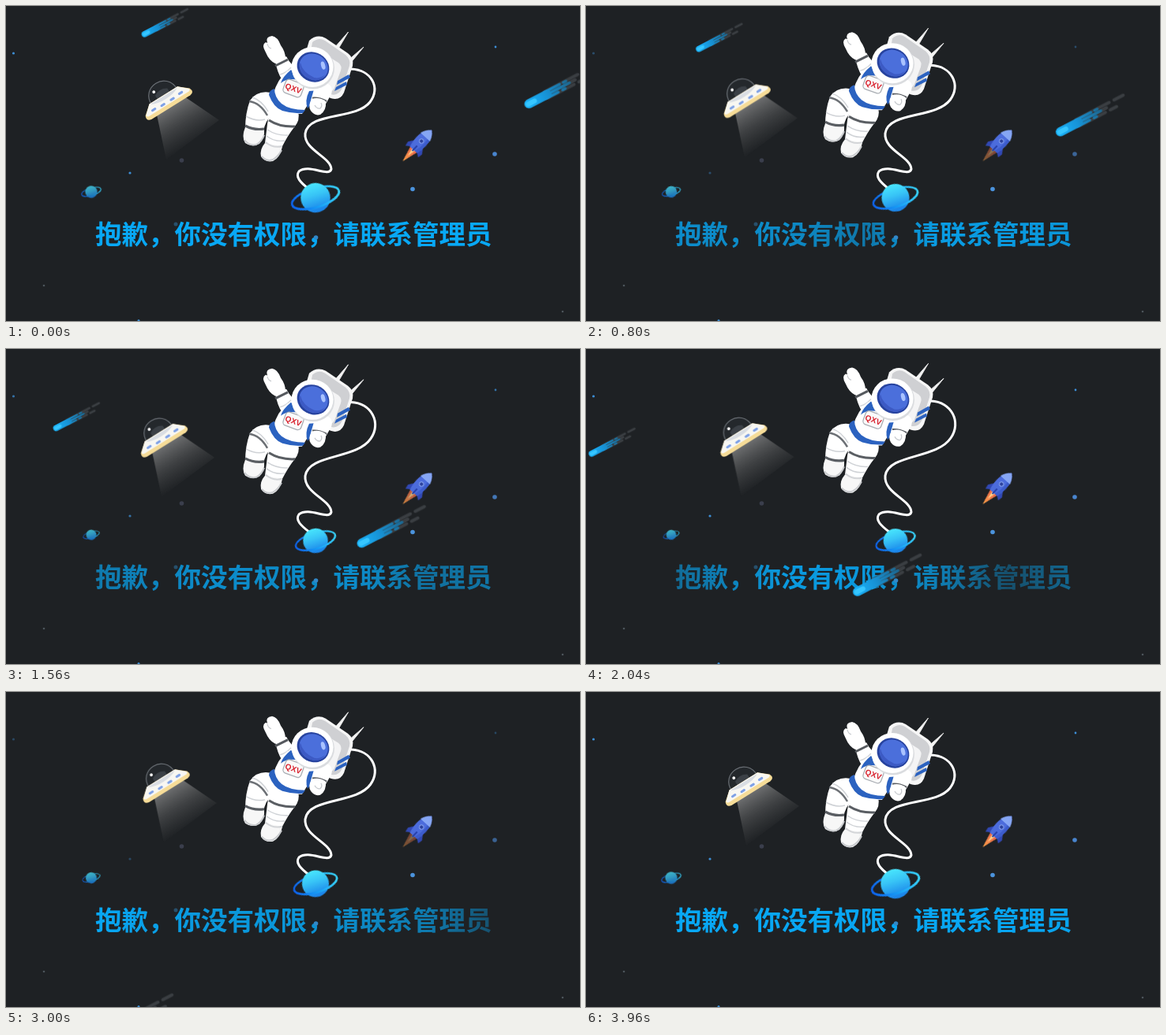
Recreate the animation shown at these times as an HTML page. Size 727 by 400 pixels, loop 4 s.

```html
<!DOCTYPE html>
<html lang="zh-CN">
<head>
<meta charset="utf-8">
<title>没有权限</title>
<style>
html, body { margin: 0; width: 100%; height: 100%; overflow: hidden; background: #1e2124; }
svg { display: block; width: 727px; height: 400px; }

.sway { animation: 2s ease-in-out infinite alternate; }
.man { animation-name: rise; }
.ufo { animation-name: drift; }
.globe { animation-name: shrink; }
.cord { animation-name: pull; fill: none; stroke: #fff; stroke-width: 3; stroke-linecap: round; }
@keyframes rise { to { transform: translateY(-14.6px); } }
@keyframes drift { to { transform: translate(-6.5px, -8px); } }
@keyframes shrink { to { transform: scale(.82); } }
@keyframes pull {
  from { d: path("M437 80C463 81 475 104 461 122C443 145 383 134 379 162C377 183 411 191 412 207C409 218 384 200 371 210C366 217 373 224 383 232"); }
  to { d: path("M437 66C463 67 476 93 462 113C444 140 383 133 379 161C377 183 411 191 412 207C409 218 384 200 371 210C366 217 373 224 385 233"); }
}

.meteor { animation: fall 4s linear infinite; }
@keyframes fall {
  0% { transform: none; animation-timing-function: cubic-bezier(.333, .029, .667, .362); }
  31.75% { transform: translateX(calc(var(--reach) * -170.2px)); }
  100% { transform: translateX(calc(var(--reach) * -870px)); }
}

.blink, .flame { animation: dim 1s ease-in-out infinite alternate; }
.blink { --low: .35; }
.faint { --low: .65; }
.flame { --low: .42; }
@keyframes dim { to { opacity: var(--low); } }

.message { font: 700 33.5px "Noto Sans CJK SC", "Noto Sans CJK", sans-serif; fill: url(#glow); }
.badge { font: 700 10px "Liberation Sans", Arial, sans-serif; fill: #d8202c; text-anchor: middle; }
#glow stop { stop-color: #08a8f5; animation: 4s linear infinite; }
#glow stop:nth-child(1) { animation-name: glow1; }
#glow stop:nth-child(2) { animation-name: glow2; }
#glow stop:nth-child(3) { animation-name: glow3; }
#glow stop:nth-child(4) { animation-name: glow4; }
#glow stop:nth-child(5) { animation-name: glow5; }
#glow stop:nth-child(6) { animation-name: glow6; }
@keyframes glow1 { 12% { stop-opacity: .84; } 28% { stop-opacity: .75; } 51% { stop-opacity: .55; } 67% { stop-opacity: 1; } }
@keyframes glow2 { 12% { stop-opacity: .85; } 28% { stop-opacity: .72; } 51% { stop-opacity: .9; } 67%, 83% { stop-opacity: .88; } }
@keyframes glow3 { 12% { stop-opacity: .6; } 28% { stop-opacity: .68; } 51% { stop-opacity: .88; } 67% { stop-opacity: .85; } 83% { stop-opacity: .9; } }
@keyframes glow4 { 12% { stop-opacity: .95; } 28% { stop-opacity: .88; } 51%, 67% { stop-opacity: .7; } 83% { stop-opacity: .85; } }
@keyframes glow5 { 12% { stop-opacity: 1; } 28% { stop-opacity: .8; } 51% { stop-opacity: .34; } 67% { stop-opacity: .58; } 83% { stop-opacity: .75; } }
@keyframes glow6 { 12% { stop-opacity: 1; } 28% { stop-opacity: .72; } 51% { stop-opacity: .52; } 67%, 83% { stop-opacity: .36; } }
</style>
</head>
<body>
<svg viewBox="0 0 727 400">
  <defs>
    <linearGradient id="glow" gradientUnits="userSpaceOnUse" x1="113" x2="615" y1="0" y2="0">
      <stop offset="0"/><stop offset=".28"/><stop offset=".48"/><stop offset=".66"/><stop offset=".84"/><stop offset="1"/>
    </linearGradient>
    <linearGradient id="ball" x1="0" y1="0" x2=".3" y2="1">
      <stop stop-color="#4df0ff"/><stop offset=".5" stop-color="#38c4f6"/><stop offset="1" stop-color="#1b86ea"/>
    </linearGradient>
    <linearGradient id="ring">
      <stop stop-color="#0c62ee"/><stop offset=".5" stop-color="#169df5"/><stop offset="1" stop-color="#37d3fa"/>
    </linearGradient>
    <linearGradient id="beam" gradientUnits="userSpaceOnUse" x1="208" y1="126" x2="238" y2="176">
      <stop stop-color="#aaa" stop-opacity=".6"/><stop offset=".5" stop-color="#888" stop-opacity=".3"/><stop offset="1" stop-color="#777" stop-opacity="0"/>
    </linearGradient>
    <linearGradient id="trail" gradientUnits="userSpaceOnUse" x1="0" x2="66" y1="0" y2="0">
      <stop stop-color="#1cb8ff"/><stop offset=".45" stop-color="#1794d8"/><stop offset="1" stop-color="#1b668f"/>
    </linearGradient>
    <linearGradient id="fire" x2="0" y2="1">
      <stop stop-color="#e8604a"/><stop offset="1" stop-color="#ffa648"/>
    </linearGradient>

    <g id="streaks" transform="rotate(2.5)" fill="none" stroke-linecap="round">
      <path d="M30 -4.5H78M85 -4.5H98M40 0H72M30 4.5H68M75 4.5H84" stroke="#3a3e42" stroke-width="4"/>
      <path d="M6 0H32" stroke="url(#trail)" stroke-width="11.5"/>
      <path d="M30 -4H52M57 -4H61M30 0H64M28 4H46M52 4H56" stroke="url(#trail)" stroke-width="3.4"/>
      <path d="M5 0H14" stroke="#36c6ff" stroke-width="6"/>
    </g>

    <g id="globe">
      <g transform="rotate(-17)" fill="none" stroke="url(#ring)" stroke-width="2.6">
        <ellipse rx="31" ry="12"/>
        <circle r="18.7" fill="url(#ball)" stroke="none" transform="rotate(17)"/>
        <path d="M-31 0A31 12 0 0 0 31 0"/>
      </g>
    </g>
  </defs>

  <g fill="#3e8fd6">
    <g class="blink"><circle cx="9.5" cy="60" r="1.6"/><circle cx="157" cy="212" r="1.6"/><circle cx="620" cy="52" r="1.4"/></g>
    <circle class="blink faint" cx="619" cy="188" r="2.8" fill="#4a86d0"/>
    <circle cx="515" cy="232.5" r="2.8" fill="#4b93dd"/>
    <circle cx="222.5" cy="196" r="2.8" fill="#3a3e4c"/>
    <g fill="#4c555b"><circle cx="48" cy="355" r="1.3"/><circle cx="705" cy="388" r="1.3"/></g>
    <circle cx="168" cy="399.5" r="1.5"/>
  </g>

  <g class="ufo sway">
    <path d="M191 138L226 115L270 145L203 195Z" fill="url(#beam)"/>
    <g transform="translate(202.5 118.5) rotate(-32)">
      <path d="M-19 -3C-20 -31 20 -31 19 -3Z" fill="#24282c" stroke="#6a6f75" stroke-width="1.2"/>
      <path d="M-9 -4V-11Q0 -17 9 -11V-4Z" fill="#3b4046"/>
      <circle cx="-8" cy="-16" r="1.9" fill="#fff"/>
      <path d="M-21 -6H21L33 4Q36 11 29 12H-29Q-36 11 -33 4Z" fill="#f6dc98"/>
      <path d="M-21 -6H21L32 4Q33 7 28 7H-28Q-33 7 -32 4Z" fill="#f8f7f2"/>
      <path d="M-20 -5C-10 1 10 1 20 -5Z" fill="#d9dde3"/>
      <path d="M-22 3H-18M-9 4H-5M5 4H9M18 3H22" stroke="#7fa1e6" stroke-width="3" stroke-linecap="round"/>
    </g>
  </g>

  <g transform="translate(523.5 174.5) rotate(43)">
    <g class="flame">
      <path d="M-6 9L0 31L6 9Z" fill="url(#fire)"/>
      <path d="M-2.5 10L0 22L2.5 10Z" fill="#ffd08a"/>
    </g>
    <path d="M-6 -1L-12 8L-11 14L-5 10ZM6 -1L12 8L11 14L5 10Z" fill="#3148b4"/>
    <path d="M0 -23C9 -16 10 -2 6 11H-6C-10 -2 -9 -16 0 -23Z" fill="#4c6cdc"/>
    <path d="M0 -23C9 -16 10 -2 6 11H2C6 -2 5 -14 0 -23Z" fill="#3c5ccb"/>
    <path d="M0 -23C5 -19 7 -15 8 -11H-8C-7 -15 -5 -19 0 -23Z" fill="#86a6f4"/>
    <circle cy="-4" r="2.8" fill="#2c429f" stroke="#8fabf4"/>
    <path d="M0 4V13" stroke="#2942ac" stroke-width="2.2"/>
  </g>

  <path class="cord sway" d="M437 80C463 81 475 104 461 122C443 145 383 134 379 162C377 183 411 191 412 207C409 218 384 200 371 210C366 217 373 224 383 232"/>
  <g transform="translate(392 243.5)"><g class="globe sway"><use href="#globe"/></g></g>
  <g transform="translate(108 236) scale(.41)" opacity=".75"><g class="globe sway"><use href="#globe"/></g></g>

  <g class="man sway">
    <!-- backpack -->
    <path d="M416 53L433.5 33L420 56ZM432 70L453 52L436 73Z" fill="#f4f4f4" stroke="#e4e4e4" stroke-linejoin="round"/>
    <path d="M384 44Q394 35 405 41L433 60Q441 66 439 76L428 110Q423 121 411 117L370 92Z" fill="#f6f6f6"/>
    <path d="M388 46Q396 39 404 44L430 62Q437 68 435 76L426 104Q421 115 411 112L380 92Z" fill="#cfd0d3"/>
    <path d="M392 54L421 72Q426 76 424 82L416 104Q412 112 402 109L380 92Z" fill="#f4f4f5"/>
    <path d="M420 95L434 87L436 91L419 100ZM418 103L431 96L432 100L416 108Z" fill="#2b62c0"/>

    <!-- raised arm -->
    <path d="M341 70L355 64Q361 76 374 84L364 107Q346 98 341 70Z" fill="#fff"/>
    <path d="M341 76L357 68" stroke="#55595e" stroke-width="3"/>
    <path d="M347 87Q355 85 361 78" fill="none" stroke="#d5d7da" stroke-width="1.5"/>
    <path d="M329 59Q323 49 329 46L331 47Q328 39 337 38Q344 39 348 50Q354 58 354 67L341 73Q333 69 329 59Z" fill="#fff"/>
    <path d="M331 48Q332 53 336 54" fill="none" stroke="#c9ccd0" stroke-width="1.2"/>

    <!-- legs -->
    <path d="M343 112Q320 104 309 120Q303 136 303 156L326 160Q328 145 337 139L354 132Z" fill="#fff"/>
    <path d="M303 154Q298 166 303 174Q311 180 321 175Q328 168 327 157Z" fill="#f7f7f7"/>
    <path d="M302 170Q308 178 317 176Q324 172 327 164" fill="none" stroke="#c9cbce" stroke-width="2"/>
    <path d="M303 152Q314 158 327 156" fill="none" stroke="#5a5e63" stroke-width="3.2"/>
    <path d="M304 140Q316 147 328 144M312 116Q324 120 332 134" fill="none" stroke="#cfd2d6" stroke-width="1.5"/>
    <path d="M308 121Q322 123 331 139" fill="none" stroke="#6c7075" stroke-width="2.5"/>
    <path d="M341 131Q332 137 331 150L328 174L349 180Q357 164 365 154Q373 145 370 134Z" fill="#fff"/>
    <path d="M328 174Q321 182 323 191Q328 199 338 197Q348 192 350 178Z" fill="#f7f7f7"/>
    <path d="M324 191Q330 198 338 195Q345 191 349 183" fill="none" stroke="#c9cbce" stroke-width="2"/>
    <path d="M329 173Q338 181 350 178" fill="none" stroke="#d3d5d8" stroke-width="2"/>
    <path d="M333 145Q347 154 366 153" fill="none" stroke="#5a5e63" stroke-width="3"/>
    <path d="M331 157Q343 165 357 164M330 165Q340 173 353 171" fill="none" stroke="#cfd2d6" stroke-width="1.4"/>

    <!-- torso -->
    <path d="M357 82Q344 92 338 113L340 127Q351 138 375 137L391 111L404 104Z" fill="#fff"/>
    <path d="M340 105Q333 107 333 113Q339 129 350 133Q363 137 376 136L379 132Q359 132 349 124Q340 116 340 105Z" fill="#2b62c0"/>
    <path d="M361 81Q350 90 348 98Q356 91 370 94Z" fill="#2b62c0"/>
    <path d="M384 108Q378 120 382 130L389 121L397 107Z" fill="#2b62c0"/>
    <g transform="translate(364 104.5) rotate(20)">
      <rect x="-12" y="-9" width="24" height="18" rx="4.5" fill="#fafafa" stroke="#a9adb3" stroke-width="1.3"/>
      <text class="badge" y="3.6">QXV</text>
    </g>

    <!-- lowered arm -->
    <path d="M400 96Q416 99 412 112L404 126L386 120L390 106Z" fill="#fff"/>
    <path d="M388 117Q396 116 406 121" fill="none" stroke="#5a5e63" stroke-width="2.6"/>
    <path d="M387 118Q382 127 386 133Q391 140 398 138Q406 133 405 121Q397 115 387 118Z" fill="#fff"/>
    <path d="M391 126Q394 131 398 130Q401 127 399 123" fill="none" stroke="#c7cace" stroke-width="1.3"/>

    <!-- helmet -->
    <ellipse cx="389" cy="79" rx="27" ry="26.5" fill="#dadcdf"/>
    <ellipse cx="388" cy="77.5" rx="26.5" ry="25.5" fill="#fff"/>
    <g transform="translate(389 77.5) rotate(30)">
      <ellipse rx="21" ry="18.5" fill="#27439f"/>
      <ellipse cx=".5" cy="-.5" rx="18.7" ry="16.2" fill="#4b6fdb"/>
      <path d="M-17 3Q-8 13 8 11Q15 9 18 1Q17 15 1 15.5Q-14 15 -17 3Z" fill="#3c5ac4"/>
      <ellipse cx="10" cy="-8" rx="2.6" ry="5.2" transform="rotate(-45 10 -8)" fill="#a9c2ff"/>
    </g>
  </g>

  <text class="message" x="113" y="301.5">抱歉，你没有权限，请联系管理员</text>
  <circle cx="215" cy="277" r="2.5" fill="#27506c"/>
  <circle cx="392.5" cy="294" r="2.8" fill="#3288c8"/>

  <g transform="translate(657 127) rotate(-30)"><g class="meteor" style="--reach:1"><use href="#streaks"/></g></g>
  <g transform="translate(172 37.5) rotate(-30) scale(.68)"><g class="meteor" style="--reach:.777"><use href="#streaks"/></g></g>
</svg>
</body>
</html>
```
